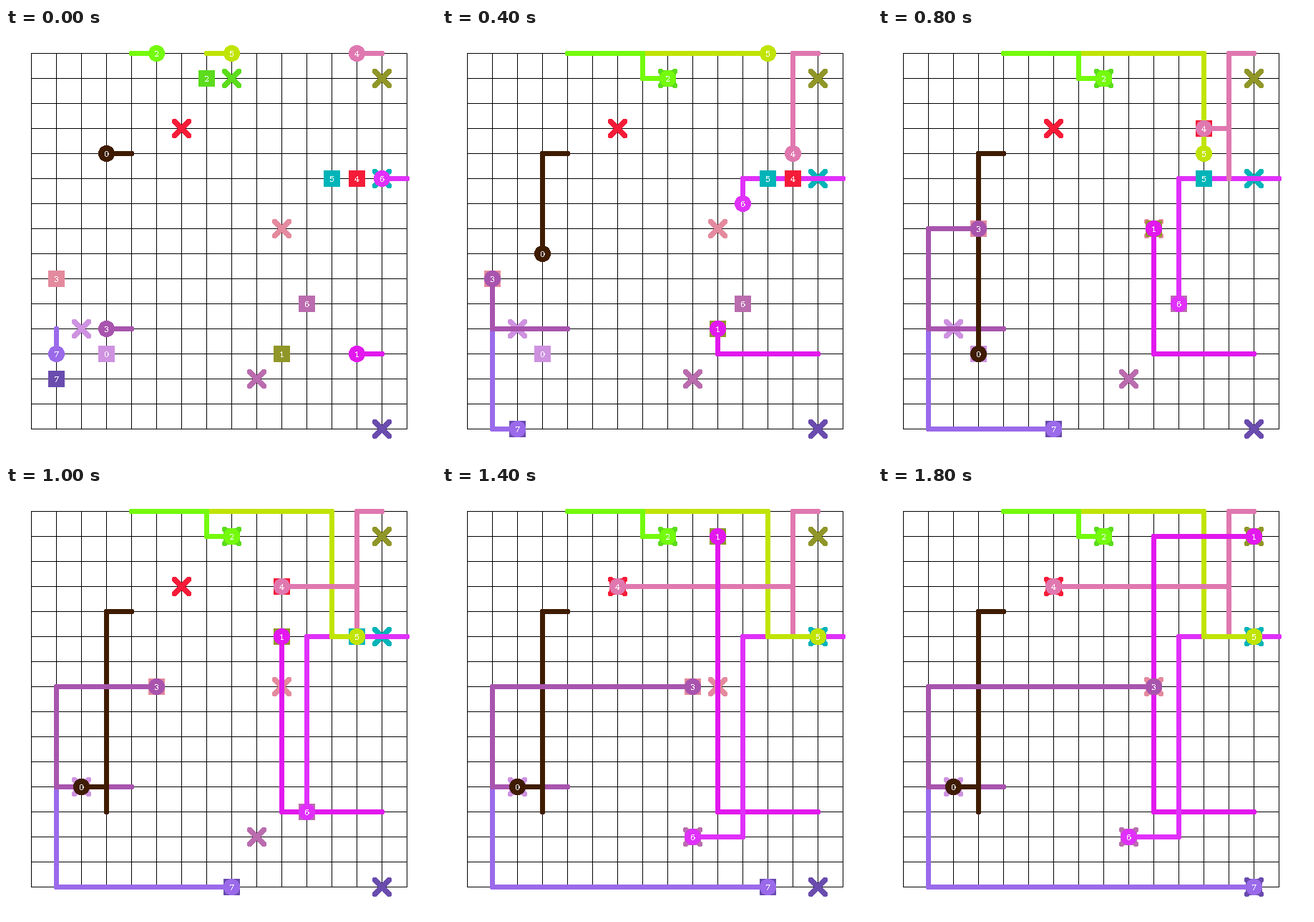
Recreate the animation shown at these times as a matplotlib script. Size 601x601 px, loop 1900 ms.

```python
import matplotlib.pyplot as plt
from matplotlib.animation import FuncAnimation
from matplotlib.patches import Circle, Rectangle

SIZE, DPI = 601, 100
CELL, CELLS = 35, 15
FRAMES, STEP_MS = 19, 100
PT = 72 / DPI  # points per pixel

# robot colour, load colour, then the cells (column, row) of start, load and goal
ROBOTS = [
    ("#3f1c00", "#ce92e0", (4, 4), (3, 12), (2, 11)),
    ("#e218ee", "#909628", (14, 12), (10, 12), (14, 1)),
    ("#74fa0c", "#5cdc1c", (4, 0), (7, 1), (8, 1)),
    ("#a854ae", "#e48a9e", (4, 11), (1, 9), (10, 7)),
    ("#e078b0", "#f41c38", (14, 0), (13, 5), (6, 3)),
    ("#c0e404", "#00b4b8", (7, 0), (12, 5), (14, 5)),
    ("#e030fa", "#ba6cae", (15, 5), (11, 10), (9, 13)),
    ("#9a6aea", "#6a4cae", (1, 11), (1, 13), (14, 15)),
]

fig = plt.figure(figsize=(SIZE / DPI, SIZE / DPI), dpi=DPI, facecolor="white")
ax = fig.add_axes([0, 0, 1, 1])
ax.set_xlim(0, SIZE)
ax.set_ylim(SIZE, 0)
ax.axis("off")


def px(n):
    """Centre of the pixel on grid line n."""
    return CELL * (n + 1) + 0.5


def steps(a, b):
    """Whole numbers after a, up to and including b."""
    d = 1 if b > a else -1
    return range(a + d, b + d, d) if a != b else ()


def walk(start, load, goal):
    """Sideways then along to the load, along then sideways to the goal."""
    cells = [start]
    cells += [(x, start[1]) for x in steps(start[0], load[0])]
    cells += [(load[0], y) for y in steps(start[1], load[1])]
    cells += [(load[0], y) for y in steps(load[1], goal[1])]
    cells += [(x, goal[1]) for x in steps(load[0], goal[0])]
    return cells + [goal] * (FRAMES + 1 - len(cells))


def stroke(xs, ys, color, z):
    line, = ax.plot(xs, ys, color=color, lw=7 * PT, zorder=z, snap=False,
                    solid_capstyle="round", antialiased=False)
    return line


def bar(x, y, w, h):
    ax.add_patch(Rectangle((x, y), w, h, fc="black", lw=0, zorder=0,
                           antialiased=False))


class Token:
    """A numbered shape that can be put on a grid cell."""

    def __init__(self, n, color, is_box, z):
        self.is_box = is_box
        self.shape = Rectangle((0, 0), 23, 23) if is_box else Circle((0, 0), 10.95)
        self.shape.set(facecolor=color, linewidth=0, zorder=z, antialiased=False)
        ax.add_patch(self.shape)
        self.label = ax.text(0, 0, str(n), color="white", family="DejaVu Serif",
                             size=11.5 * PT, ha="center", va="baseline",
                             zorder=z + 0.01, antialiased=False)

    def put(self, cell):
        x, y = px(cell[0]), px(cell[1])
        if self.is_box:
            self.shape.set_xy((x - 11.5, y - 11.5))
        else:
            self.shape.center = (x, y)
        self.label.set_position((x, y + 4.5))


for k in range(CELLS + 1):
    at = CELL * (k + 1)
    bar(at, CELL, 1, CELL * CELLS + 1)
    bar(CELL, at, CELL * CELLS + 1, 1)

for _, color, _, _, goal in ROBOTS:
    gx, gy = map(px, goal)
    for s in (1, -1):
        stroke([gx - 10, gx + 10], [gy - 10 * s, gy + 10 * s], color, 1)

routes = [walk(*robot[2:]) for robot in ROBOTS]
boxes = [Token(i, r[1], True, 3 + i / 10) for i, r in enumerate(ROBOTS)]
agents = [Token(i, r[0], False, 4 + i / 10) for i, r in enumerate(ROBOTS)]

# later trail pieces lie over earlier ones
trails = []
for t in range(FRAMES):
    for robot, route in zip(ROBOTS, routes):
        a, b = route[t], route[t + 1]
        if a != b:
            piece = stroke([px(a[0]), px(b[0])], [px(a[1]), px(b[1])], robot[0], 2)
            trails.append((t, piece))


def update(frame):
    for t, piece in trails:
        piece.set_visible(t <= frame)
    for robot, route, box, agent in zip(ROBOTS, routes, boxes, agents):
        here, load = route[frame + 1], robot[3]
        box.put(here if load in route[:frame + 2] else load)
        agent.put(here)
    return []


anim = FuncAnimation(fig, update, frames=FRAMES, interval=STEP_MS,
                     repeat=True, repeat_delay=0, blit=False)
plt.show()
```
